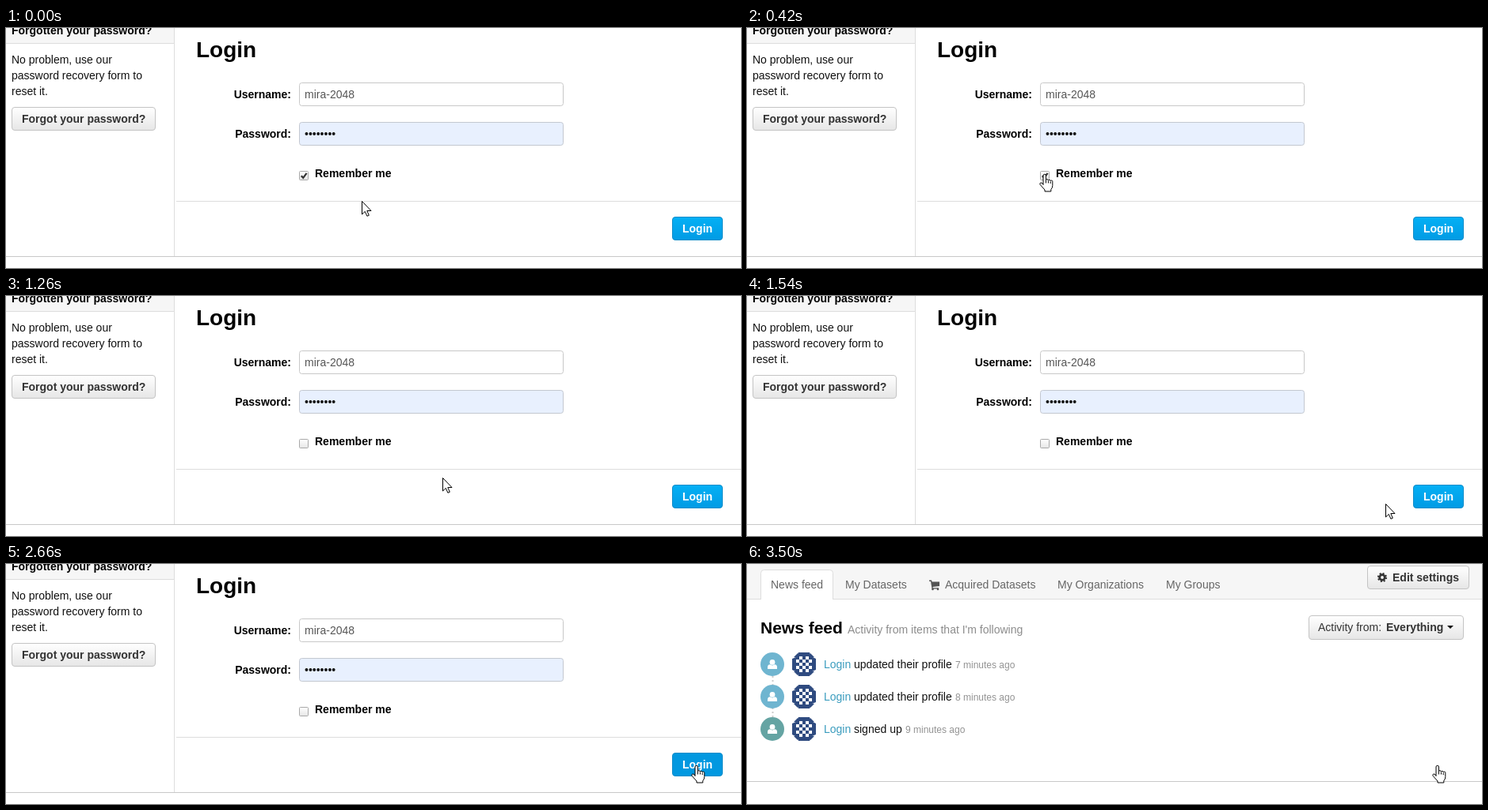
An HTML page for the animation above (4.22 s loop, 928x304 px).

```html
<!DOCTYPE html>
<html lang="en">
<head>
<meta charset="utf-8">
<title>Login</title>
<style>
  html, body { margin: 0; width: 100%; height: 100%; overflow: hidden; background: #fff; }
  svg { display: block; font: 14px Arial, "Liberation Sans", sans-serif; fill: #111; }
  .b { font-weight: bold; fill: #000; }
  .grey { fill: #333; }
  .nav { fill: #666; }
  .link { fill: #3a9cbe; }
  .time { font-size: 12px; fill: #939393; }
  .rule { stroke: #ddd; }
  .button { fill: url(#grey); stroke: #c4c4c4; }
</style>
</head>
<body>
<svg width="928" height="304" viewBox="0 0 928 304">
  <defs>
    <linearGradient id="grey" x2="0" y2="1"><stop stop-color="#fff"/><stop offset="1" stop-color="#e6e6e6"/></linearGradient>
    <linearGradient id="blue" x2="0" y2="1"><stop stop-color="#04b0f5"/><stop offset="1" stop-color="#019be4"/></linearGradient>
    <g id="person" fill="#fff">
      <circle cy="-2.6" r="3.4"/>
      <path d="M-6 6V3.5Q-6 .5-3 .3Q0 2.5 3 .3Q6 .5 6 3.5V6Z"/>
    </g>
    <g id="avatar">
      <path fill="#2f4b80" d="M-7-15H7L9-10 15-7V7L10 9 7 15H-7L-9 10-15 7V-7L-10-9Z"/>
      <path fill="#2f4b80" d="M-13-9-9-13M-13-9-8-14-7-8ZM13-9 8-14 7-8ZM-13 9-8 14-7 8ZM13 9 8 14 7 8Z"/>
      <g id="checks" fill="#fff"></g>
    </g>
  </defs>

  <g id="login">
    <rect width="212" height="19" fill="#f6f6f6"/>
    <path class="rule" d="M0 19.5H212M212.5 0V289M215 219.5H928"/>
    <path stroke="#c8c8c8" d="M0 289.5H928"/>
    <text class="b" x="7" y="8">Forgotten your password?</text>
    <text x="7" y="45">No problem, use our</text>
    <text x="7" y="65">password recovery form to</text>
    <text x="7" y="85">reset it.</text>
    <rect class="button" x="7.5" y="100.5" width="181" height="29" rx="3.5"/>
    <text class="b grey" x="20" y="120">Forgot your password?</text>

    <text class="b" x="240" y="37" font-size="28">Login</text>
    <text class="b" x="360" y="89" text-anchor="end">Username:</text>
    <text class="b" x="360" y="139" text-anchor="end">Password:</text>
    <rect x="370.5" y="69.5" width="333" height="29" rx="3" fill="#fff" stroke="#c8c8c8"/>
    <rect x="370.5" y="119.5" width="333" height="29" rx="3" fill="#e8f0fe" stroke="#c3c8d0"/>
    <text x="377" y="89" fill="#555">mira-2048</text>
    <text x="377" y="139">••••••••</text>

    <rect x="370.5" y="181.5" width="11" height="11" rx="1" fill="url(#grey)" stroke="#a9a9a9"/>
    <path id="tick" d="M372.8 187.2 375.2 189.8 379.6 183.8" fill="none" stroke="#333" stroke-width="2.2"/>
    <text class="b" x="390" y="189">Remember me</text>

    <rect id="submit" x="841.5" y="239.5" width="63" height="29" rx="3.5"/>
    <text x="854" y="259" font-weight="bold" fill="#fff">Login</text>
  </g>

  <g id="feed">
    <rect width="928" height="44" fill="#f6f6f6"/>
    <path class="rule" d="M0 44.5H928"/>
    <path class="rule" fill="#fff" d="M17.5 45V11.5a4 4 0 0 1 4-4H104.500a4 4 0 0 1 4 4V45"/>
    <text class="nav" x="30" y="31">News feed</text>
    <text class="nav" x="124" y="31">My Datasets</text>
    <g fill="#555">
      <path d="M230 20.500h3l.6 2H243v5.500l-8.500 1 .3 1.200H242v1.300h-8.500L232 22h-2Z"/>
      <circle cx="234.500" cy="32" r="1.300"/><circle cx="241" cy="32" r="1.300"/>
    </g>
    <text class="nav" x="250" y="31">Acquired Datasets</text>
    <text class="nav" x="392" y="31">My Organizations</text>
    <text class="nav" x="529" y="31">My Groups</text>
    <rect class="button" x="783.5" y="2.5" width="128" height="29" rx="3.5"/>
    <g fill="none" stroke="#333">
      <circle cx="802" cy="17" r="3.300" stroke-width="2.800"/>
      <circle cx="802" cy="17" r="5.100" stroke-width="2" stroke-dasharray="2 2.005"/>
    </g>
    <text class="b grey" x="815" y="22">Edit settings</text>

    <text class="b" x="17" y="88" font-size="21">News feed</text>
    <text x="127" y="88" fill="#8c8c8c">Activity from items that I'm following</text>
    <rect class="button" x="709.5" y="65.5" width="195" height="30" rx="3.5"/>
    <text class="grey" x="721" y="85">Activity from:</text>
    <text class="b grey" x="807" y="85">Everything</text>
    <path d="M884 78h8l-4 4Z"/>
    <path d="M32.500 127V209" stroke="#ccc" stroke-width="2" stroke-dasharray="2 3"/>
    <g id="rows"></g>
    <path stroke="#c8c8c8" d="M0 275.500H928"/>
  </g>

  <g fill="#fff" stroke="#000" stroke-linejoin="round">
    <path id="arrow" d="M.5.5V17L4.300 13.400 6.900 19.300 9.300 18.300 6.800 12.500H12Z"/>
    <path id="hand" d="M5 14V2.500a1.700 1.700 0 0 1 3.400 0V8a1.600 1.600 0 0 1 3 .6 1.500 1.500 0 0 1 2.800.6 1.400 1.400 0 0 1 2.600.8V15q0 3-2 5v2.500H7V20.500L1.200 14q-1-1.600.4-2.400 1.300-.6 2.400.8ZM8.400 8v4M11.400 9v3M14.200 10v2.500"/>
  </g>
</svg>
<script>
const LOOP = 4220;
const $ = id => document.getElementById(id);
const show = (id, on) => $(id).style.display = on ? "" : "none";

// Checkerboard in the middle of the avatar
for (let i = 0; i < 25; i++) {
  if (i % 2) $("checks").innerHTML +=
    `<rect x="${i % 5 * 4 - 10}" y="${Math.floor(i / 5) * 4 - 10}" width="4" height="4"/>`;
}

const rows = [
  ["updated their profile", 263, "7 minutes ago", "#6fb5d0"],
  ["updated their profile", 263, "8 minutes ago", "#6fb5d0"],
  ["signed up", 200, "9 minutes ago", "#65a4a3"],
];
$("rows").innerHTML = rows.map(([action, x, age, color], i) => `
  <g transform="translate(0 ${127 + 41 * i})">
    <circle cx="32" r="15" fill="${color}"/>
    <use href="#person" x="32"/>
    <use href="#avatar" x="72"/>
    <text class="link" x="97" y="5">Login</text>
    <text x="135" y="5">${action}</text>
    <text class="time" x="${x}" y="5">${age}</text>
  </g>`).join("");

// start time, x, y, pointer
const moves = [
  [0, 449, 219, "arrow"], [140, 415, 203, "arrow"], [280, 384, 190, "arrow"],
  [420, 369, 184.5, "hand"], [1120, 440, 200, "arrow"], [1260, 551, 230, "arrow"],
  [1400, 690, 271, "arrow"], [1540, 806, 263, "arrow"], [1680, 865, 254.5, "hand"],
];
// start time, fill, border
const submitStates = [
  [0, "url(#blue)", "#0b8cc9"], [1680, "#019fe8", "#0b8cc9"], [1820, "#019be4", "#0b8cc9"],
  [2660, "#0198e0", "#0b8cc9"], [2800, "#019be4", "#7cc3ee"],
];
const current = (steps, t) => steps.findLast(step => step[0] <= t);

function draw() {
  const t = performance.now() % LOOP;
  const [, x, y, pointer] = current(moves, t);
  const [, fill, border] = current(submitStates, t);
  show("login", t < 3500);
  show("feed", t >= 3500);
  show("tick", t < 980);
  $("submit").setAttribute("fill", fill);
  $("submit").setAttribute("stroke", border);
  for (const id of ["arrow", "hand"]) show(id, id === pointer);
  $(pointer).setAttribute("transform", `translate(${x} ${y})`);
  requestAnimationFrame(draw);
}
draw();
</script>
</body>
</html>
```
